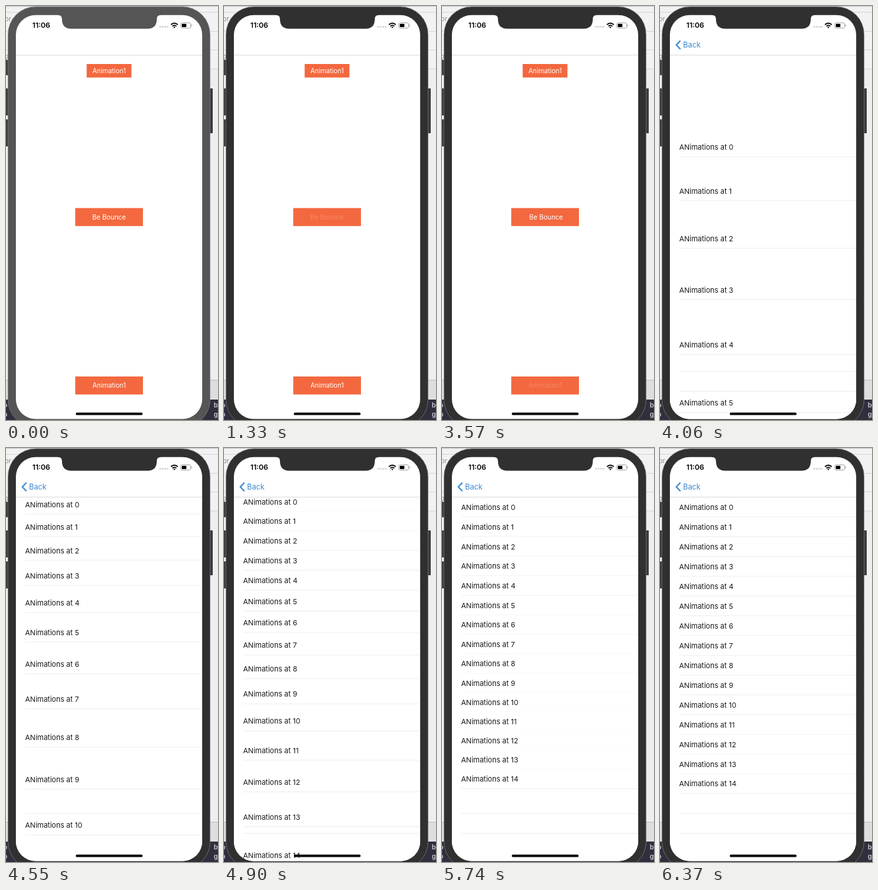
An HTML page that plays this animation: 322 by 628 pixels, repeating every 6.51 s.

```html
<!DOCTYPE html>
<html lang="en">
<head>
<meta charset="utf-8">
<title>Bouncing button and springing list</title>
<style>
  html, body { margin: 0; width: 100%; height: 100%; overflow: hidden; background: #f1f1f1; }
  svg { display: block; width: 322px; height: 628px; font-family: Inter, Roboto, sans-serif; }
  .btn rect { fill: #f3683f; }
  .btn text { fill: #fff; font-size: 10px; text-anchor: middle; }
  .row text { fill: #1a1a1a; font-size: 11px; }
  .line { fill: #eee; }
</style>
</head>
<body>
<svg viewBox="0 0 322 628">
  <defs>
    <clipPath id="screen"><rect x="15" y="13.800" width="283" height="612.800" rx="30"/></clipPath>
    <clipPath id="below"><rect x="15" y="75" width="283" height="553"/></clipPath>
  </defs>

  <!-- windows behind the phone -->
  <rect width="322" height="628" fill="#f2f2f2"/>
  <path d="M0 .5H322" stroke="#c4c4c4"/>
  <path d="M0 9.5H322M0 38.5H322M0 66.5H322M300 95.5H322" stroke="#d6d6d6"/>
  <rect x="308" y="96" width="14" height="471" fill="#eee"/>
  <rect y="567" width="322" height="30" fill="#dedede"/>
  <path d="M0 567.5H322" stroke="#bdbdbd"/>
  <rect y="597" width="322" height="31" fill="#302f3d"/>
  <g font-size="10" fill="#8a8a8a">
    <text x="-2" y="23">or</text>
    <text x="-2" y="82">2</text>
  </g>
  <g font-size="10" font-weight="600" fill="#c9c9d2">
    <text x="315.500" y="609">b</text>
    <text x="315.500" y="623">g</text>
    <text x="-4" y="609">o</text>
    <text x="-4" y="623">o</text>
  </g>

  <!-- phone body -->
  <path d="M0 82h3v23h-3zM0 125h3v41h-3zM0 172h3v41h-3zM309 125h5v68h-5z" fill="#3b3b3b"/>
  <rect id="bezel" x="3" y="1" width="307" height="638" rx="42" stroke="#8b8b8b" stroke-width=".6"/>

  <g clip-path="url(#screen)">
    <rect x="15" y="13" width="283" height="615" fill="#fff"/>
    <g clip-path="url(#below)">
      <g id="home"></g>
      <g id="list">
        <rect x="15" y="75" width="283" height="553" fill="#fff"/>
        <rect class="line" x="29" y="554" width="269" height="1"/>
        <rect class="line" x="29" y="584" width="269" height="1"/>
      </g>
    </g>
    <rect x="15" y="74" width="283" height="1" fill="#dcdcdc"/>
    <g id="back" fill="#3d8ad0">
      <path d="M31 52.500L24.800 59L31 65.500" fill="none" stroke="#3d8ad0" stroke-width="2"/>
      <text id="label" x="35" y="63" font-size="11.400">Back</text>
    </g>
    <rect x="106" y="616.800" width="101.500" height="3.700" rx="1.850"/>
  </g>
  <path id="notch" d="M79 13V13.800Q85 13.800 85 20Q85 34.400 99 34.400H215Q229 34.400 229 20Q229 13.800 235 13.800V13Z"/>

  <!-- status bar -->
  <text x="40" y="33.300" font-size="11" font-weight="600">11:06</text>
  <path d="M233 31.500H247" stroke="#c8c8c8" stroke-width="2" stroke-dasharray="2.500 1.200"/>
  <path d="M250.500 28.300Q255.700 23.800 260.900 28.300M252.600 30.600Q255.700 28 258.800 30.600" fill="none" stroke="#000" stroke-width="1.700"/>
  <path d="M254 32Q255.700 30.800 257.400 32L255.700 33.800Z"/>
  <rect x="265.500" y="25.500" width="15" height="8" rx="2.300" fill="none" stroke="#a5a5a5"/>
  <rect x="267" y="27" width="7" height="5" rx="1"/>
  <path d="M282 28v3" stroke="#a5a5a5"/>
</svg>

<script>
const LOOP = 6510, STEP = 70, WIDTH = 283, ROWS = 15;
const TAP = 1330, BOUNCE = 1400, TAP2 = 3430, PUSH = 3600, PUSH_TIME = 500, DROP = 3457;

const $ = id => document.getElementById(id);
const clamp = v => Math.max(0, Math.min(1, v));
const shift = (el, x, y) => el.setAttribute('transform', `translate(${x} ${y})`);

function add(parent, tag, attrs, text = '') {
  const el = document.createElementNS('http://www.w3.org/2000/svg', tag);
  for (const key in attrs) el.setAttribute(key, attrs[key]);
  el.textContent = text;
  return parent.appendChild(el);
}

function button(x, y, width, height, text) {
  const g = add($('home'), 'g', { class: 'btn' });
  return {
    box: add(g, 'rect', { x, y, width, height }),
    label: add(g, 'text', { x: 156.6, y: y + height / 2 + 3.6 }, text)
  };
}

button(122.5, 88, 68, 20.5, 'Animation1');
const bouncer = button(105.2, 306.5, 102.8, 27.3, 'Be Bounce');
const opener = button(105.2, 562, 102.8, 27.3, 'Animation1');

const rows = Array.from({ length: ROWS }, (_, i) => {
  const g = add($('list'), 'g', { class: 'row' });
  const top = 75 + 30 * i;
  add(g, 'rect', { x: 15, y: top, width: WIDTH, height: 29, fill: '#fff' });
  add(g, 'rect', { class: 'line', x: 29, y: top + 29, width: 269, height: 1 });
  add(g, 'text', { x: 29, y: top + 18.9 }, `ANimations at ${i}`);
  return g;
});

// Spring with damping ratio 0.8, from 1 to 0; p is the phase in radians.
const spring = p => p <= 0 ? 1 : Math.exp(-4 / 3 * p) * (Math.cos(p) + 4 / 3 * Math.sin(p));

function bounce(t) {
  const s = Math.max(0, t - BOUNCE);
  return s > 1600 ? 0 : 28 * Math.exp(-s / 480) * Math.sin(2 * Math.PI * s / 320);
}

// Text dims at once on touch and fades back on release.
const touch = (t, down, up) => t < down ? 1 : 0.2 + 0.8 * clamp((t - up) / 280);

function draw(t) {
  const body = t < TAP ? '#555' : '#303030';
  $('bezel').setAttribute('fill', body);
  $('notch').setAttribute('fill', body);

  const d = bounce(t);
  bouncer.box.setAttribute('x', 105.2 - d);
  bouncer.box.setAttribute('width', 102.8 + 2 * d);
  shift(bouncer.label, 1.5 * clamp((t - 2660) / 600), 0);
  bouncer.label.setAttribute('opacity', touch(t, TAP, BOUNCE));
  opener.label.setAttribute('opacity', touch(t, TAP2, PUSH));

  const e = 1 - (1 - clamp((t - PUSH) / PUSH_TIME)) ** 3;
  shift($('home'), -0.3 * WIDTH * e, 0);
  shift($('list'), WIDTH * (1 - e), 0);
  $('back').setAttribute('opacity', e);
  shift($('label'), 90 * (1 - e), 0);

  rows.forEach((row, i) => shift(row, 0, 606 * spring(0.00242 * (t - DROP) - 0.14 * i)));
}

let start;
function tick(now) {
  start ??= now;
  draw(Math.floor((now - start) % LOOP / STEP) * STEP);
  requestAnimationFrame(tick);
}
draw(0);
requestAnimationFrame(tick);
</script>
</body>
</html>
```
